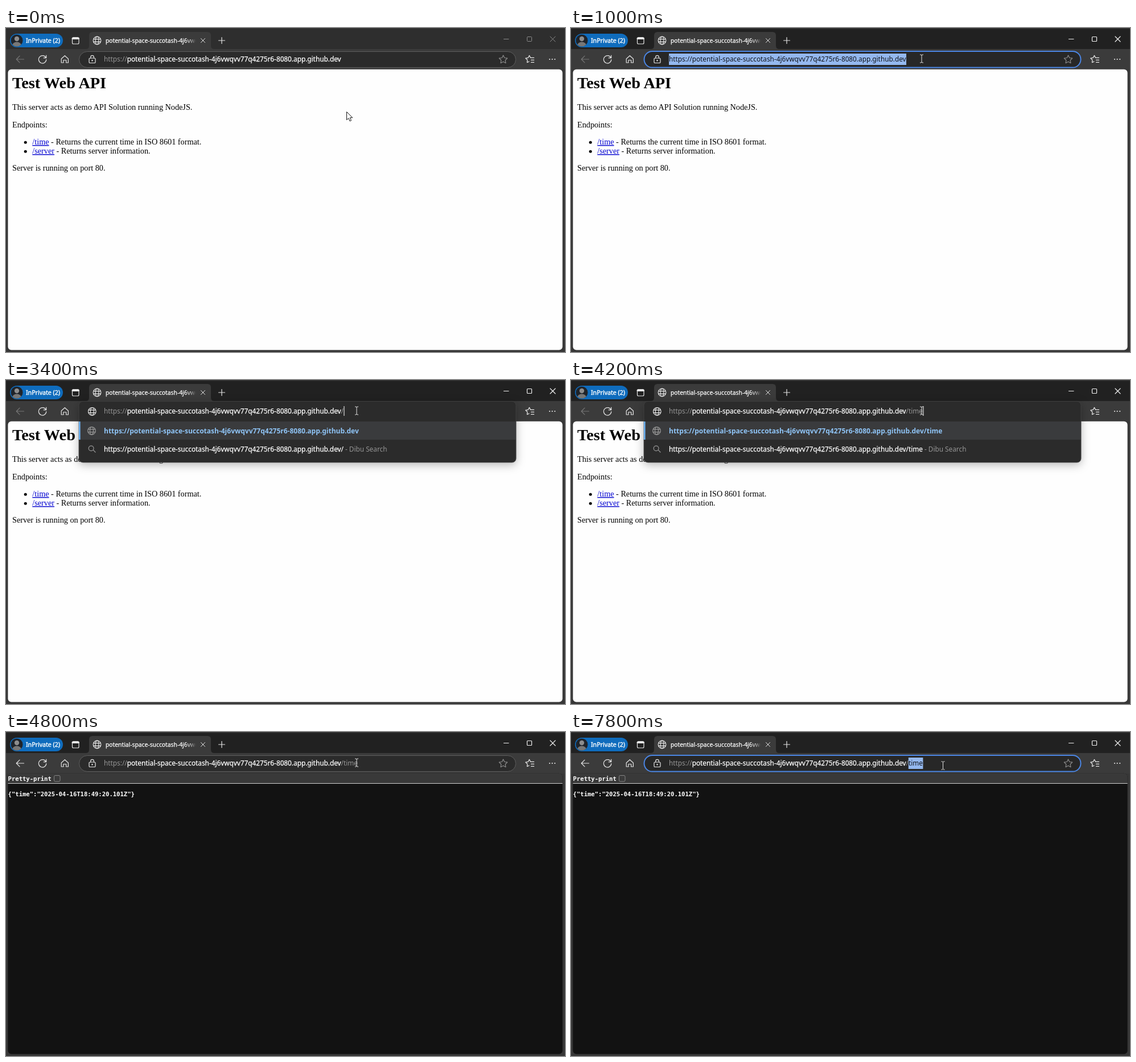
Write an HTML page that moves like this. It is 982 px wide and 570 px high and loops after 8 s.

```html
<!DOCTYPE html>
<html lang="en">
<head>
<meta charset="utf-8">
<title>Test Web API</title>
<style>
  html, body { margin: 0; width: 100%; height: 100%; overflow: hidden; background: #373737; }
  svg { display: block; width: 982px; height: 570px; }
  text { white-space: pre; }
  .ui { font-family: "Noto Sans", "Open Sans", sans-serif; fill: #fff; stroke: #fff; stroke-width: .25; }
  .url { font-size: 11.8px; }
  .page { font: 14.22px "Liberation Serif", "Times New Roman", serif; fill: #000; }
  .page .link { fill: #0000d0; text-decoration: underline; }
  .json { font: bold 10.55px "DejaVu Sans Mono", monospace; fill: #fff; }
  .icon { fill: none; stroke: #e6e6e6; stroke-width: 1.2; stroke-linecap: round; stroke-linejoin: round; }
  .dim { stroke: #777; }
  .grey { fill: #959595; stroke: none; }
  .picked tspan, .dark { fill: #10141c; stroke: none; }
  #tab { fill: url(#fade); stroke: url(#fade); }
  #match { fill: #8fc4f6; stroke: none; }
  #menu { filter: drop-shadow(0 4px 8px rgba(0, 0, 0, .28)); }
</style>
</head>
<body>
<svg viewBox="0 0 982 570">
  <defs>
    <linearGradient id="fade" gradientUnits="userSpaceOnUse" x1="314" x2="334">
      <stop stop-color="#fff"/><stop offset="1" stop-color="#fff" stop-opacity="0"/>
    </linearGradient>
    <clipPath id="view"><rect x="3.4" y="72.7" width="974.2" height="493.7" rx="6"/></clipPath>
    <clipPath id="face"><circle cx="19" cy="22" r="10.5"/></clipPath>
    <g id="globe">
      <circle r="6.8"/><ellipse rx="3" ry="6.8"/><path d="M-6.3-2.4H6.3M-6.3 2.4H6.3"/>
    </g>
    <path id="star" d="M0-7.5 2.2-3 7.2-2.3 3.6 1.2 4.4 6.2 0 3.8-4.4 6.2-3.6 1.2-7.2-2.3-2.2-3Z"/>
    <path id="cross" d="M-4.5-4.5 4.5 4.5M4.5-4.5-4.5 4.5"/>
  </defs>

  <!-- title bar -->
  <rect width="982" height="570" fill="#373737"/>
  <rect width="982" height="38" fill="#212121"/>
  <rect width="982" height="38" fill="#2e2e2e" data-on="0-800"/>
  <rect width="982" height="1.5" fill="#363636"/>
  <rect y="37" width="982" height="36" fill="#3b3b3b"/>
  <path d="M140 37Q146 37 146 31V13Q146 7 152 7H354Q360 7 360 13V31Q360 37 366 37Z" fill="#3b3b3b"/>
  <rect x="7" y="10" width="93" height="24" rx="12" fill="#0f6cbd"/>
  <g clip-path="url(#face)">
    <rect x="8" y="11" width="22" height="22" fill="#20242a"/>
    <circle cx="19" cy="19" r="4.2" fill="#8d8d8d"/>
    <ellipse cx="19" cy="31" rx="8" ry="6.5" fill="#777"/>
  </g>
  <text class="ui" x="35" y="26" font-size="10.6" style="stroke-width:.4">InPrivate (2)</text>
  <g class="icon">
    <rect x="116.5" y="16.5" width="11.5" height="11.5" rx="2"/>
    <path d="M117 18.5H127.5" stroke-width="3"/>
    <use href="#globe" x="160" y="22" data-on="0-4600 4800-8000"/>
    <use href="#cross" transform="translate(346 22) scale(.8)"/>
    <path d="M373.5 22H384.5M379 16.5V27.5"/>
  </g>
  <g fill="#ddd" data-on="4600-4800">
    <circle cx="153.3" cy="20.5" r="1"/><circle cx="156" cy="26.5" r="1.2"/>
  </g>
  <text class="ui" id="tab" x="175" y="26" font-size="10.3">potential-space-succotash-4j6vwq</text>
  <g class="icon" id="buttons">
    <path d="M874.5 19.5H883"/>
    <rect x="915.5" y="15.5" width="8" height="8" rx="1"/>
    <use href="#cross" x="960.5" y="19.5"/>
  </g>

  <!-- toolbar -->
  <g class="icon">
    <path id="back" d="M31.5 55H18.5M24 49.2 18.2 55 24 60.8"/>
    <path d="M70.2 52.5A6.7 6.7 0 1 0 70.8 55.5M70.7 48.2V52.7H66.2" data-on="0-4600 4800-8000"/>
    <use href="#cross" x="64" y="55" data-on="4600-4800"/>
    <path d="M97.2 54.2 103.3 48.7 109.4 54.2V61H105.6V56.5H101V61H97.2Z"/>
    <path transform="translate(920 55)" d="M-1 4-4.6 5.6-4 1.2-7.2-1.8-2.8-2.6-.6-6.6 1.5-2.6H7.5M2.5 1.4H7.5M2.5 5.4H7.5"/>
  </g>
  <g fill="#e6e6e6"><circle cx="955" cy="55" r="1.1"/><circle cx="959.6" cy="55" r="1.1"/><circle cx="964.2" cy="55" r="1.1"/></g>

  <!-- pages -->
  <g clip-path="url(#view)">
    <g data-on="0-4800" class="page">
      <rect x="3" y="72" width="976" height="496" fill="#fefefe"/>
      <text x="11" y="106" font-size="28.3" font-weight="bold">Test Web API</text>
      <text x="11" y="144">This server acts as demo API Solution running NodeJS.</text>
      <text x="11" y="174.5">Endpoints:</text>
      <circle cx="34.2" cy="201.2" r="2.5"/>
      <text x="46.3" y="205"><tspan class="link">/time</tspan> - Returns the current time in ISO 8601 format.</text>
      <circle cx="34.2" cy="217.2" r="2.5"/>
      <text x="46.3" y="221"><tspan class="link">/server</tspan> - Returns server information.</text>
      <text x="11" y="251">Server is running on port 80.</text>
    </g>
    <g data-on="4800-8000" class="json">
      <rect x="3" y="72" width="976" height="496" fill="#121212"/>
      <rect x="3" y="72" width="976" height="18" fill="#393939"/>
      <rect x="3" y="90" width="976" height="1" fill="#d0d0d0"/>
      <text x="3.6" y="85.5">Pretty-print</text>
      <rect x="84.5" y="76.5" width="10.5" height="10.5" rx="2" fill="#3b3b3b" stroke="#858585"/>
      <text x="3.6" y="113">{"time":"2025-04-16T18:49:20.101Z"}</text>
    </g>
  </g>

  <!-- address bar -->
  <rect x="128.5" y="41.5" width="767" height="28" rx="14" fill="#2b2b2b" stroke="#5e5e5e"/>
  <rect x="128.5" y="41" width="767" height="28.5" rx="14.2" fill="#272727" stroke="#4b86e4" stroke-width="2" data-on="800-3200 7000-8000"/>
  <use href="#star" class="icon dim" style="stroke:#8a8a8a" x="873.5" y="55.5"/>
  <g class="icon">
    <g data-on="0-3200 4800-8000">
      <rect x="146" y="53" width="11" height="8.5" rx="1.6"/>
      <path d="M148.7 53V51.2A2.8 2.8 0 0 1 154.3 51.2V53"/>
      <circle cx="151.5" cy="57.2" r=".6" fill="#e6e6e6"/>
    </g>
    <g data-on="4600-4800"><circle cx="151.3" cy="55.2" r="6.8"/><path d="M151.3 54.5V58.5M151.3 51.9V52"/></g>
  </g>

  <!-- suggestions -->
  <g data-on="3200-4600">
    <rect id="menu" x="128" y="37.5" width="768" height="107.5" rx="7" fill="#2b2b2b" stroke="#444" stroke-width=".8"/>
    <rect x="128" y="73" width="768" height="32" fill="#3a3b3d"/>
    <rect x="128" y="73" width="2.6" height="32" fill="#6cb0f0"/>
    <g class="icon">
      <use href="#globe" x="151.3" y="55.3"/>
      <use href="#globe" class="dim" style="stroke:#999" x="150.5" y="89.3"/>
      <path style="stroke:#999" d="M153.2 123.2 157 127M154 120.2A4.4 4.4 0 1 1 145.2 120.2 4.4 4.4 0 1 1 154 120.2"/>
    </g>
    <text class="ui" id="match" x="172" y="94" font-size="12" font-weight="bold"></text>
    <text class="ui url" x="172" y="126"><tspan id="query"></tspan><tspan class="grey"> - Dibu Search</tspan></text>
  </g>

  <!-- address -->
  <rect x="172" y="45" width="417" height="20" fill="#94b8ef" data-on="800-2000"/>
  <rect x="172" y="45" width="446.5" height="20" fill="#94b8ef" data-on="7000-7400"/>
  <rect x="592.8" y="45" width="25.6" height="20" fill="#94b8ef" data-on="7800-8000"/>
  <text class="ui url" id="address" x="172" y="59.3"><tspan class="grey">https://</tspan><tspan id="host"></tspan><tspan class="grey" id="slash"></tspan><tspan class="grey" id="path"></tspan></text>
  <rect id="caret" y="46" width="1" height="17" fill="#fff" data-on="2000-2600 3200-4600 7400-7800"/>

  <!-- pointer -->
  <path id="arrow" d="M0 0V14.2L3.3 11.2 5.5 16.3 8 15.2 5.8 10.3H10.2Z" fill="#fff" stroke="#111" stroke-linejoin="round"/>
  <path id="beam" d="M-3-7H-1.2L0-6.2 1.2-7H3M0-6.2V6.2M-3 7H-1.2L0 6.2 1.2 7H3" fill="none" stroke="#e4e4e4"/>
</svg>
<script>
  const LOOP = 8000;
  const HOST = "potential-space-succotash-4j6vwqvv77q4275r6-8080.app.github.dev";
  // time, x, y
  const POINTER = [
    [0, 598.5, 147.5], [200, 602, 134], [400, 608, 106], [600, 615, 64], [800, 616, 54],
    [6200, 620, 55], [6400, 632, 58], [6600, 645, 60], [6800, 653.5, 59]
  ];
  const $ = id => document.getElementById(id);
  const inside = (t, ranges) => ranges.some(([a, b]) => t >= a && t < b);
  const timed = [...document.querySelectorAll("[data-on]")].map(el => ({
    el, ranges: el.dataset.on.split(" ").map(r => r.split("-").map(Number))
  }));

  function typed(t) {
    if (t < 3200) return "";
    return "/time".slice(0, 1 + Math.max(0, Math.floor((t - 3400) / 200)));
  }

  function render(t) {
    for (const { el, ranges } of timed) el.style.display = inside(t, ranges) ? "" : "none";

    const path = typed(t);
    $("slash").textContent = path.slice(0, 1);
    $("path").textContent = path.slice(1);
    $("match").textContent = "https://" + HOST + (path.length > 1 ? path : "");
    $("query").textContent = "https://" + HOST + path;
    $("address").classList.toggle("picked", inside(t, [[800, 2000], [7000, 7400]]));
    $("path").classList.toggle("dark", t >= 7800);
    $("caret").setAttribute("x", 172.5 + $("address").getComputedTextLength());

    $("buttons").style.stroke = t < 800 ? "#8c8c8c" : "#f0f0f0";
    $("buttons").style.strokeWidth = t < 800 ? 1 : 1.2;
    $("back").classList.toggle("dim", t < 4800);

    const [, x, y] = POINTER.filter(p => p[0] <= t).pop();
    const overBar = y < 70;
    for (const id of ["arrow", "beam"]) {
      $(id).setAttribute("transform", `translate(${x} ${y})`);
      $(id).style.display = (id === "beam") === overBar ? "" : "none";
    }
  }

  $("host").textContent = HOST;
  const start = performance.now();
  function frame() {
    render((performance.now() - start) % LOOP);
    requestAnimationFrame(frame);
  }
  render(0);
  requestAnimationFrame(frame);
</script>
</body>
</html>
```
